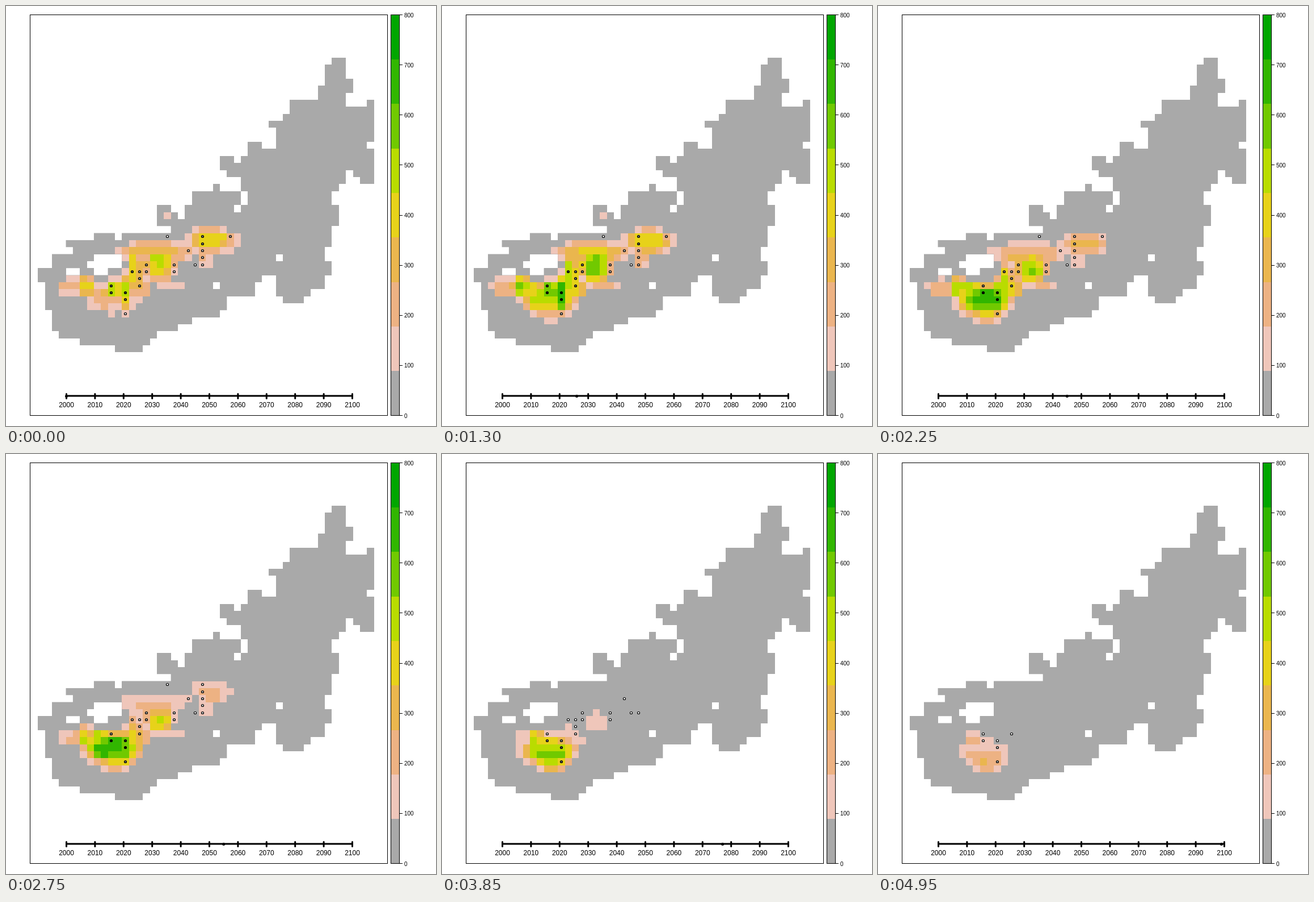
These frames come from a looping animation (758x739 px, 5000 ms). An HTML page:

```html
<!DOCTYPE html>
<html lang="en">
<head>
<meta charset="utf-8">
<title>Map over time</title>
<style>
html, body { margin: 0; width: 100%; height: 100%; overflow: hidden; background: #fff; }
svg { display: block; width: 100%; height: 100%; }
text { font-family: "Liberation Sans", Arial, sans-serif; fill: #000; }
</style>
</head>
<body>
<svg id="stage" viewBox="0 0 758 739">
  <defs>
    <path id="land" transform="translate(56.2 91.06) scale(12.34)" fill-rule="evenodd" clip-rule="evenodd" d="
      M42 0H44V3H45V5H44V7H47V6H48V12H47V13H48V18H46V17H45V16H44V18H43V19H42V21H43V24H42V27H41V29H42V31
      H41V33H39V34H38V35H35V34H34V31H32V32H31V34H27V36H26V37H22V38H20V39H17V40H16V41H15V42H11V41H6V40H3V39
      H2V36H1V32H0V30H2V28H5V27H4V26H8V25H11V26H12V25H19V24H17V21H19V22H20V23H21V21H22V19H25V18H26V19H29
      V17H27V16H26V14H28V15H29V14H30V12H32V13H34V10H33V9H35V8H36V6H40V4H41V1H42Z
      M8 28H12V30H10V31H8V30H7V29H8ZM4 30h2v1h-2zM29 19h1v2h-1zM28 21h1v1h-1zM34 28h1v1h-1zM25 32h1v1h-1z"/>
    <clipPath id="coast"><use href="#land"/></clipPath>
  </defs>
  <g shape-rendering="crispEdges">
    <use href="#land" fill="#a9a9a9"/>
    <g id="cells" clip-path="url(#coast)"></g>
    <rect x="42.5" y="15.5" width="630" height="705" fill="none" stroke="#000"/>
    <g id="legend"></g>
  </g>
  <g id="axis"></g>
  <g id="sites" stroke="#000" stroke-width="1.2"></g>
  <circle id="now" cy="686.5" r="2.5"/>
</svg>
<script>
const LOOP = 5000, STEP = 50, CELL = 12.34, LEFT = 56.2, TOP = 91.06;
const RISE = 2000, FALL = 1250, DRIFT = 350;
const colors = ["#a9a9a9", "#efc6ba", "#edb283", "#eab64e", "#e7d21a",
                "#b9dc00", "#71c900", "#31b600", "#00a600"];

// Hills of the density: column, row, half width, half height, top level, time of the top
const hills = [
  [24.4, 25.6, 3.5, 1.9, 4.7, 1000],
  [16.3, 27.2, 5.4, 1.6, 4.2, 1200],
  [16.8, 29.2, 2.3, 2.6, 6.7, 1500],
  [13.2, 30.8, 1.1, 4, 5.7, 1500],
  [23.4, 28.3, 1.3, 1.3, 2.6, 1400],
  [18.4, 32, 2.2, .8, 2.5, 1500],
  [14.1, 32.3, 1.3, 1.9, 4.9, 1700],
  [12, 33.3, 1, 2.6, 7.9, 1700],
  [10.4, 32.6, 1.2, 1.6, 6.5, 1300],
  [6.3, 32.2, 1.4, 1.6, 6.5, 1700],
  [4.2, 32.3, 2.4, 1.5, 2.9, 1700],
  [8.4, 32.6, 1.2, 1.4, 5.9, 3100],
  [10.2, 34.1, 3.9, 2.35, 7.6, 2900],
  [10.6, 35.9, 2.6, 1.4, 5.2, 3600],
  [18, 22, .6, .6, 1.5, 900]
];
const sites = [
  [18, 25], [23, 25], [27, 25], [23, 26], [21, 27], [23, 27], [23, 28], [15, 29],
  [19, 29], [22, 29], [23, 29], [13, 30], [14, 30], [15, 30], [19, 30], [14, 31],
  [10, 32], [14, 32], [10, 33], [12, 33], [12, 34], [12, 36]
];

const $ = id => document.getElementById(id);
function add(parent, tag, attrs, label) {
  const el = document.createElementNS("http://www.w3.org/2000/svg", tag);
  for (const k in attrs) el.setAttribute(k, attrs[k]);
  if (label !== undefined) el.textContent = label;
  return parent.appendChild(el);
}
const px = c => LEFT + c * CELL, py = r => TOP + r * CELL;

// Fixed unevenness of the ground, within 6 percent
function ground(c, r) {
  const n = Math.sin(c * 12.9898 + r * 78.233) * 43758.5453;
  return .94 + .12 * (n - Math.floor(n));
}

// Each hill rises and falls; its southern cells follow later
function level(c, r, t) {
  let best = 0;
  for (const [hc, hr, w, h, top, at] of hills) {
    const q = ((c - hc) / w) ** 2 + ((r - hr) / h) ** 2;
    const late = t - at - DRIFT * (r - hr);
    const d = late / (late < 0 ? RISE : FALL);
    best = Math.max(best, top * Math.exp(-q * q - d * d / 2));
  }
  return best * ground(c, r);
}

// Sites are lost from the north-east to the south-west
function siteEnd(c, r) {
  return c > 21 ? 3100 + 250 * (r - 25) - 180 * (c - 23)
                : 3120 + 910 * (r - 25) ** .38;
}

const cells = [];
for (let r = 22; r < 38; r++) {
  for (let c = 2; c < 29; c++) {
    const x = Math.round(px(c)), y = Math.round(py(r));
    const el = add($("cells"), "rect", {
      x, y, width: Math.round(px(c + 1)) - x, height: Math.round(py(r + 1)) - y
    });
    cells.push({ c, r, el });
  }
}
const dots = sites.map(([c, r]) => ({
  c, r, end: siteEnd(c, r),
  el: add($("sites"), "circle", {
    cx: Math.floor(px(c + .5)) + .5, cy: Math.floor(py(r + .5)) + .5, r: 2
  })
}));

const band = 705 / colors.length;
colors.forEach((fill, i) => add($("legend"), "rect", {
  x: 678, y: 720.5 - (i + 1) * band, width: 16, height: band, fill
}));
add($("legend"), "rect", { x: 678.5, y: 15.5, width: 15, height: 705, fill: "none", stroke: "#000" });
for (let i = 0; i <= 8; i++) {
  const y = 720.5 - i * 705 / 8;
  add($("legend"), "path", { d: `M694 ${y}h5`, stroke: "#000" });
  add($("axis"), "text", { x: 702, y: y + 4, "font-size": 10 }, i * 100);
}

const yearX = y => 106.5 + y * 5.04;
const ink = { stroke: "#000", "stroke-width": 3, "stroke-linecap": "round" };
add($("axis"), "path", { d: "M106.5 686H610.5", ...ink });
for (let y = 0; y <= 100; y += 10) {
  add($("axis"), "path", { d: `M${yearX(y)} 682.5v8`, ...ink });
  add($("axis"), "text", { x: yearX(y), y: 706, "font-size": 12, "text-anchor": "middle" }, 2000 + y);
}

function draw(t) {
  for (const { c, r, el } of cells) {
    el.setAttribute("fill", colors[Math.min(8, Math.floor(level(c, r, t)))]);
  }
  for (const { c, r, end, el } of dots) {
    const v = level(c, r, t);
    const g = v < 1 ? 255 : Math.round(255 * Math.max(0, 1 - v / 7));
    el.setAttribute("fill", `rgb(${g},${g},${g})`);
    el.setAttribute("visibility", t < end ? "visible" : "hidden");
  }
  $("now").setAttribute("cx", yearX(t / STEP));
}

const start = performance.now();
let last = 0;
function tick() {
  const t = Math.floor((performance.now() - start) % LOOP / STEP) * STEP;
  if (t !== last) draw(last = t);
  requestAnimationFrame(tick);
}
draw(0);
requestAnimationFrame(tick);
</script>
</body>
</html>
```
